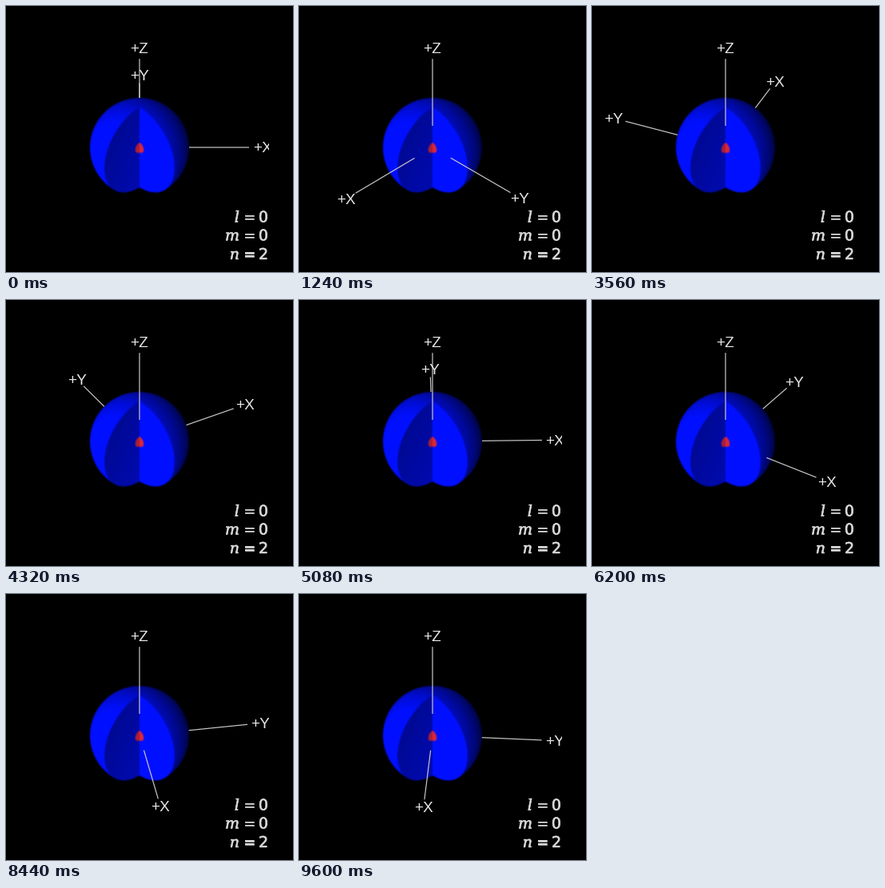
Animation of 359x333 px, one loop 9.64 s. Source, as a matplotlib script:

```python
import numpy as np
import matplotlib.pyplot as plt
from matplotlib import patheffects
from matplotlib.animation import FuncAnimation
from matplotlib.patches import Rectangle

W, H, DPI = 359, 333, 100
FRAMES, STEP = 241, 40
PT = 72 / DPI                      # points per pixel
CX, CY = 167, 177
BALL, CORE = 62, 7.5
GAP, TIP, LABEL = 32, 137, 153.5   # radii along each axis
TILT = np.radians(36)              # camera elevation
SIN, COS = np.sin(TILT), np.cos(TILT)
LINE, WHITE = "#c8c8c8", "#e6e6e6"

# Heading of the X axis (degrees) at a few moments (seconds): a slowing spin
TIMES = [0, 1, 1.24, 2.48, 3.56, 4.03, 5.08, 6.02, 7.32, 8, 9.6]
HEADINGS = [360, 247.5, 225.8, 128.7, 66.3, 43.5, 0.4, -28.5, -60.6, -73.5, -94.2]
SPIN = np.polyfit(TIMES, HEADINGS, 5)


def project(r, deg):
    a = np.radians(deg)
    return CX + r * np.cos(a), CY - r * np.sin(a) * SIN


def brightness(normal):
    az, el = np.radians(228), np.radians(18)
    light = (np.cos(el) * np.cos(az), np.cos(el) * np.sin(az), np.sin(el))
    dot = sum(n * c for n, c in zip(normal, light))
    return np.clip(0.55 + 0.58 * dot, 0.22, 1)


def soften(img):
    for axis in (0, 1):
        img = (np.roll(img, 1, axis) + 2 * img + np.roll(img, -1, axis)) / 4
    return img


def render_ball(ss=4):
    """Ball with a quarter wedge cut out towards the viewer."""
    gx, gy = np.meshgrid((np.arange(W * ss) + 0.5) / ss,
                         (np.arange(H * ss) + 0.5) / ss)
    x, y = gx - CX, CY - gy
    depth2 = BALL**2 - x**2 - y**2
    d = np.sqrt(np.maximum(depth2, 0))
    px, py, pz = x, y * SIN - d * COS, y * COS + d * SIN
    wedge = np.abs(px) < -py
    skin = (depth2 > 0) & ~wedge

    s = np.abs(x) * np.sqrt(2)
    z = (SIN * np.abs(x) + y) / COS
    rad = np.hypot(s, z)
    wall = (rad < BALL) & ~skin & (depth2 > 0)
    base = (np.abs(x) < 0.32 * CORE) & (y < 0) & (y > -0.91 * CORE)
    core = wall & ((rad < CORE) | base)

    # The shaded wall picks up some light towards its lower inner corner
    h = np.sqrt(0.5)
    glow = np.clip((x / 44 + 1) / 2 + (50 - y) / 200, 0, 1)
    left = brightness((h, -h, 0)) - 0.05 + 0.16 * glow
    right = brightness((-h, -h, 0))
    b = np.where(skin, brightness((px / BALL, py / BALL, pz / BALL)), 0)
    b = np.where(wall, np.where(x < 0, left, right), b)

    img = b[..., None] * np.array([0, 0.06, 1.0])
    img[core & (x < 0)] = (0.66, 0.12, 0.22)
    img[core & (x >= 0)] = (0.86, 0.15, 0.22)
    return soften(img.reshape(H, ss, W, ss, 3).mean(axis=(1, 3)))


fig = plt.figure(figsize=(W / 100, H / 100), dpi=DPI, facecolor="black")
ax = fig.add_axes([0, 0, 1, 1])
ax.imshow(render_ball(), extent=(0, W, H, 0), interpolation="nearest", aspect="auto")
ax.set_xlim(0, W)
ax.set_ylim(H, 0)
ax.axis("off")


def stroke(xs=(), ys=()):
    return ax.plot(xs, ys, color=LINE, lw=1.2 * PT, solid_capstyle="butt",
                   dash_capstyle="butt", snap=False, zorder=3)[0]


def axis_label(name, x=CX, y=CY):
    return ax.text(x, y + 6.3, "+" + name, color=WHITE, family="Liberation Sans",
                   size=19 * PT, ha="center", va="baseline", zorder=4)


class FlatAxis:
    """A horizontal axis that turns around the ball."""

    def __init__(self, name):
        self.outer, self.inner = stroke(), stroke()
        self.label = axis_label(name)

    def place(self, deg):
        deg %= 360
        a = np.radians(deg)
        start = BALL
        if np.sin(a) > 0:          # hidden up to the ball's outline
            start /= np.hypot(np.cos(a), np.sin(a) * SIN)
        self.outer.set_data(*project(np.array([start, TIP]), deg))
        self.inner.set_data(*project(np.array([GAP, BALL]), deg))
        off = abs(deg - 270)
        self.inner.set_visible(off < 53)
        self.inner.set_linestyle("-" if off < 48 else (0, (4, 1.5)))
        x, y = project(LABEL, deg)
        self.label.set_position((x, y + 6.3))


x_axis, y_axis = FlatAxis("X"), FlatAxis("Y")
stroke([CX, CX], [CY - TIP * COS, CY - BALL])
z_inner = stroke([CX, CX], [CY - BALL, 150])
axis_label("Z", CX - 0.3, 53)

# Labels are cut off at the right edge of the scene
ax.add_patch(Rectangle((328.7, 0), W - 328.7, H, color="black", lw=0, zorder=5))

GRAY = "#d6d6d6"
bolder = [patheffects.withStroke(linewidth=0.6 * PT, foreground=GRAY)]
for letter, digit, base in (("l", "0", 270.5), ("m", "0", 293.5), ("n", "2", 317)):
    style = dict(color=GRAY, size=19 * PT, va="baseline", zorder=6, path_effects=bolder)
    ax.text(292, base, letter, family="DejaVu Serif", style="italic", ha="right", **style)
    ax.text(304.5, base, "=", family="DejaVu Sans", ha="center", **style)
    ax.text(328, base, digit, family="DejaVu Sans", ha="right", **style)


def update(i):
    heading = np.polyval(SPIN, i * STEP / 1000) if i else 0
    x_axis.place(heading)
    y_axis.place(heading + 90)
    z_inner.set_visible(i > 0)
    return []


anim = FuncAnimation(fig, update, frames=FRAMES, interval=STEP,
                     repeat=True, repeat_delay=0, blit=False)
plt.show()
```
